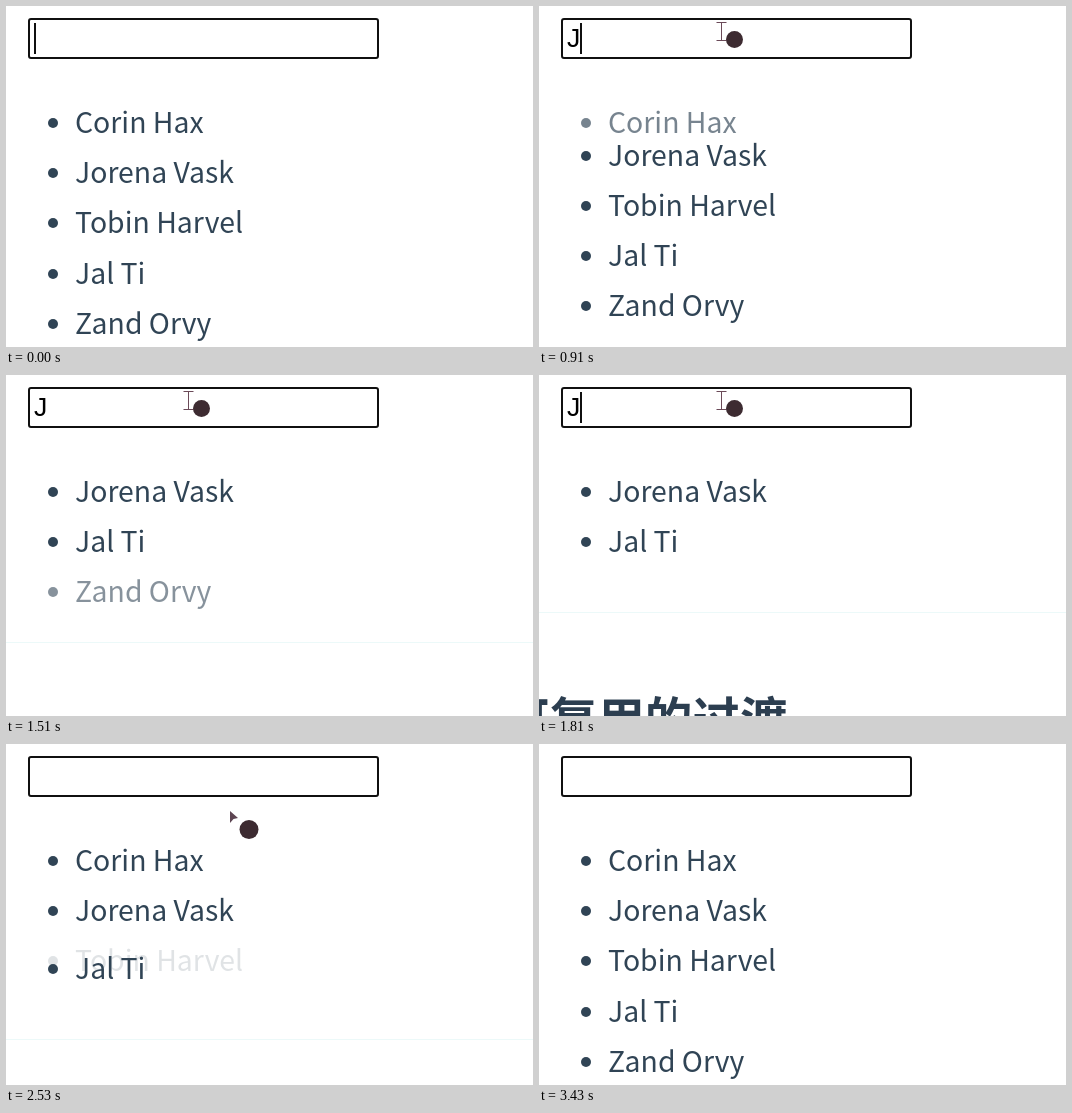
An HTML page for the animation above (3730 ms loop, 527 px wide and 341 px high).

```html
<!DOCTYPE html>
<html lang="zh">
<head>
<meta charset="utf-8">
<title>Filtered list</title>
<style>
  html, body { margin: 0; height: 100%; overflow: hidden; background: #fff; }
  svg { display: block; width: 100%; height: 100%; }
  text { white-space: pre; }
  #list { font: 28.4px "Noto Sans CJK SC", "Noto Sans CJK", "Noto Sans", sans-serif; fill: #304455; }
  #typed { font: 26.67px "Liberation Sans", Arial, sans-serif; }
  #heading { font: 700 47.6px "Noto Sans CJK SC", "Noto Sans CJK", sans-serif; fill: #2c3e50; }
</style>
</head>
<body>
<svg viewBox="0 0 527 341">
  <rect id="blurred" x="24.5" y="14.5" width="346" height="36" rx="2" fill="none" stroke="#767676"/>
  <rect id="focused" x="23" y="13" width="349" height="39" rx="2" fill="none" stroke="#101010" stroke-width="2"/>
  <text id="typed" x="28" y="41">J</text>
  <rect id="caret" y="17" width="2" height="31" fill="#101010"/>
  <g id="list"></g>
  <g id="below">
    <path d="M0 0H527" stroke="#ecf9f9"/>
    <text id="heading" x="-37" y="124.5">可复用的过渡</text>
  </g>
  <g id="pointer">
    <g id="beam">
      <path d="M0.5 1.5H10.5M5.5 2V19M0.5 19.5H10.5" fill="none" stroke="#6b4a58"/>
      <circle cx="18.5" cy="18.5" r="8.5" fill="#3d2b31"/>
    </g>
    <g id="arrow">
      <path d="M1 1L9 8L4.5 9L1 13Z" fill="#5d4552"/>
      <circle cx="20" cy="19.5" r="9.5" fill="#3d2b31"/>
    </g>
  </g>
</svg>
<script>
const LOOP = 3730, ROW = 50.2, TYPED = 730, CLEARED = 2130, FOCUS = 490;
const STAGGER = 150, DURATION = 400, BLINK = 530;
const names = ["Corin Hax", "Jorena Vask", "Tobin Harvel", "Jal Ti", "Zand Orvy"];

// Spans in which the picture refreshes every 100 ms; it rests between them.
const spans = [[0, 0], [190, 690], [790, 1090], [1210, 1810], [2210, 2410], [2530, 3230], [3430, 3430]];

// Pointer path: time, x, y
const path = [
  [190, 230, 169], [490, 180, 9], [690, 177, 15], [2210, 177, 15],
  [2530, 223, 66], [2730, 240, 88], [2930, 418, 190]
];

const $ = id => document.getElementById(id);
const show = (id, on) => $(id).setAttribute("visibility", on ? "visible" : "hidden");
const move = (el, x, y) => el.setAttribute("transform", `translate(${x} ${y})`);
const swing = x => 0.5 - Math.cos(Math.PI * Math.min(1, Math.max(0, x))) / 2;

$("list").innerHTML = names.map(name =>
  `<g><circle cx="47" cy="-10" r="5"/><text x="69">${name}</text></g>`).join("");
const rows = [...$("list").children];

function refreshTime(t) {
  const [start, end] = spans.filter(span => span[0] <= t).pop();
  return Math.min(end, start + Math.floor((t - start) / 100) * 100);
}

function rowScale(t, i) {
  if (names[i].includes("J")) return 1;
  const progress = begin => swing((t - begin - i * STAGGER) / DURATION);
  return 1 - progress(TYPED) + progress(CLEARED);
}

function drawList(t) {
  let height = 0;
  rows.forEach((row, i) => {
    const scale = rowScale(t, i);
    move(row, 0, Math.round(127 + height));
    row.setAttribute("opacity", scale);
    height += ROW * scale;
  });
  move($("below"), 0, Math.floor(239 + height - 2 * ROW) - 0.5);
}

function drawInput(t) {
  const focused = t < 190 || t >= FOCUS;
  const filled = t >= TYPED && t < CLEARED;
  const blinkOn = t < TYPED || Math.floor((t - TYPED) / BLINK) % 2 === 0;
  show("focused", focused);
  show("blurred", !focused);
  show("typed", filled);
  show("caret", focused && blinkOn);
  $("caret").setAttribute("x", filled ? 41 : 28);
}

function drawPointer(t) {
  const next = path.findIndex(point => point[0] > t);
  const last = path[path.length - 1];
  const visible = t >= path[0][0] && t <= last[0];
  let [, x, y] = last;
  if (next > 0) {
    const [t0, x0, y0] = path[next - 1], [t1, x1, y1] = path[next];
    const k = (t - t0) / (t1 - t0);
    x = x0 + (x1 - x0) * k;
    y = y0 + (y1 - y0) * k;
  }
  move($("pointer"), Math.round(x), Math.round(y));
  show("beam", visible && y < 42);
  show("arrow", visible && y >= 42);
}

function frame() {
  const t = refreshTime(performance.now() % LOOP);
  drawInput(t);
  drawList(t);
  drawPointer(t);
  requestAnimationFrame(frame);
}
frame();
</script>
</body>
</html>
```
